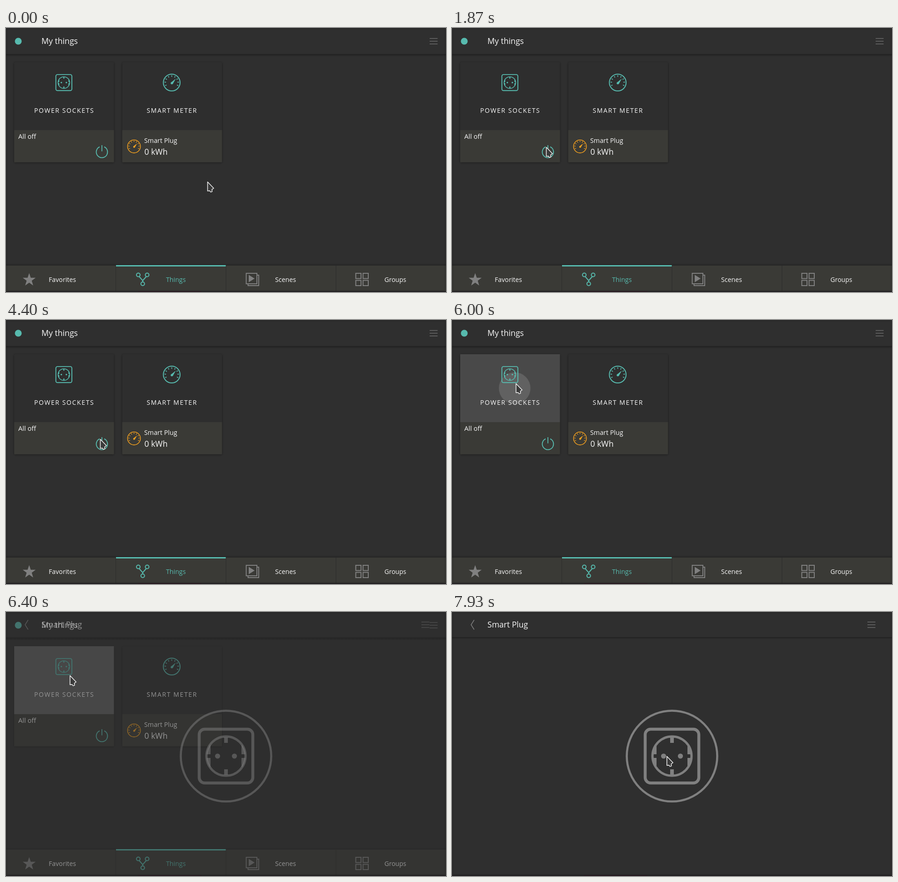
Recreate the animation shown at these times as an HTML page with a canvas. Size 968 px wide and 579 px high, loop 8000 ms.

```html
<!DOCTYPE html>
<html lang="en">
<head>
<meta charset="utf-8">
<title>My things</title>
<style>
html, body { margin: 0; width: 100%; height: 100%; overflow: hidden; background: #2f2f2f; }
canvas { display: block; width: 968px; height: 579px; }
</style>
</head>
<body>
<canvas id="stage" width="968" height="579"></canvas>
<script>
const W = 968, H = 579, LOOP = 8000, FPS = 15;
const BG = '#2f2f2f', PANEL = '#3a3a36', TEAL = '#57baae', ORANGE = '#f5a11f',
      GREY = '#808080', WHITE = '#f8f8f8';
const ctx = document.getElementById('stage').getContext('2d');

const clamp = v => Math.max(0, Math.min(1, v));
const progress = (t, from, to) => clamp((t - from) / (to - from));
const smooth = p => p * p * (3 - 2 * p);
const mix = (a, b, p) => a + (b - a) * p;

function text(str, x, y, size, color = WHITE, spacing = 0) {
  ctx.font = `${size}px "Open Sans", "Noto Sans", sans-serif`;
  ctx.letterSpacing = spacing + 'px';
  ctx.fillStyle = color;
  ctx.fillText(str, x, y);
  ctx.letterSpacing = '0px';
}

function path(points, close) {
  ctx.beginPath();
  points.forEach(([x, y]) => ctx.lineTo(x, y));
  if (close) ctx.closePath();
}

function line(points, color, width, close) {
  path(points, close);
  ctx.strokeStyle = color;
  ctx.lineWidth = width;
  ctx.stroke();
}

function ring(x, y, r, color, width) {
  ctx.beginPath();
  ctx.arc(x, y, r, 0, Math.PI * 2);
  ctx.strokeStyle = color;
  ctx.lineWidth = width;
  ctx.stroke();
}

function disc(x, y, r, color) {
  ctx.beginPath();
  ctx.arc(x, y, r, 0, Math.PI * 2);
  ctx.fillStyle = color;
  ctx.fill();
}

function rect(x, y, w, h, color) {
  ctx.fillStyle = color;
  ctx.fillRect(x, y, w, h);
}

function fade(y, h, alpha, up) {
  const g = ctx.createLinearGradient(0, y, 0, y + h);
  g.addColorStop(up ? 1 : 0, `rgba(0,0,0,${alpha})`);
  g.addColorStop(up ? 0 : 1, 'rgba(0,0,0,0)');
  rect(0, y, W, h, g);
}

function at(x, y, scale, draw) {
  ctx.save();
  ctx.translate(x, y);
  ctx.scale(scale, scale);
  draw();
  ctx.restore();
}

function socket(x, y, scale, color) {
  at(x, y, scale, () => {
    ctx.strokeStyle = color;
    ctx.lineWidth = 6.5;
    ctx.beginPath();
    ctx.roundRect(-59, -59, 118, 118, 12);
    ctx.stroke();
    ring(0, 0, 43, color, 5);
    disc(-18.5, 0, 5.6, color);
    disc(18.5, 0, 5.6, color);
    rect(-4, -41, 8, 12, color);
    rect(-4, 29, 8, 12, color);
    ctx.beginPath();
    ctx.arc(0, 0, 43, 0, Math.PI * 2);
    ctx.clip();
    for (const sx of [-43, 34])
      for (const sy of [-24, 4]) rect(sx, sy, 9, 20, color);
  });
}

function meter(x, y, scale, color) {
  at(x, y, scale, () => {
    ring(0, 0, 18.4, color, 2);
    for (let i = 0; i < 9; i++) {
      const a = Math.PI * (0.86 + i * 1.28 / 8);
      const c = Math.cos(a), s = Math.sin(a);
      line([[c * 12.6, s * 12.6], [c * 16, s * 16]], color, 1.7);
    }
    path([[-1.8, 0], [9, -8.6], [2.2, 3.2]], true);
    ctx.fillStyle = color;
    ctx.fill();
    disc(0.2, 1.4, 2.5, color);
  });
}

function power(x, y) {
  ctx.beginPath();
  ctx.arc(x, y, 12.4, -Math.PI / 2 + 0.42, Math.PI * 1.5 - 0.42);
  ctx.strokeStyle = TEAL;
  ctx.lineWidth = 1.8;
  ctx.stroke();
  line([[x, y - 15], [x, y - 1.5]], TEAL, 1.8);
}

function menu(x, y) {
  for (const dy of [-6, 0, 6]) rect(x, y + dy - 0.7, 17.5, 1.4, '#707070');
}

function card(x) {
  ctx.save();
  ctx.shadowColor = 'rgba(0,0,0,.45)';
  ctx.shadowBlur = 4;
  ctx.shadowOffsetY = 1;
  ctx.beginPath();
  ctx.roundRect(x, 75, 219.5, 219.5, 2);
  ctx.fillStyle = '#2e2e2e';
  ctx.fill();
  ctx.restore();
  rect(x, 224, 219.5, 70.5, PANEL);
}

function cardPress(t) {
  const wash = progress(t, 5740, 5960);
  if (!wash) return;
  ctx.save();
  ctx.beginPath();
  ctx.rect(18, 75, 219.5, 149);
  ctx.clip();
  rect(18, 75, 220, 149, `rgba(255,255,255,${0.13 * wash})`);
  const grow = progress(t, 5900, 6282);
  if (grow) disc(mix(141.5, 127.7, grow), 149.5, 133 * grow, 'rgba(255,255,255,.13)');
  ctx.restore();
}

function powerPress(t, from, to) {
  if (t <= from || t >= to) return;
  const alpha = progress(t, from, from + 140) * (1 - progress(t, to - 250, to));
  const tint = `rgba(255,255,255,${0.13 * alpha})`;
  disc(211, 271.5, 17, tint);
  const grow = progress(t, from + 80, from + 300);
  if (grow) disc(211, 271.5, 17 * grow, tint);
}

function tabs() {
  fade(516, 5, 0.22, true);
  rect(0, 521, W, 56, PANEL);
  for (const x of [241, 483.5, 725.5]) rect(x, 521, 1, 56, '#2d2d2b');
  rect(242, 520, 241.5, 3, TEAL);

  const star = Array.from({ length: 10 }, (_, i) => {
    const r = i % 2 ? 5.9 : 15, a = -Math.PI / 2 + i * Math.PI / 5;
    return [51 + r * Math.cos(a), 552.5 + r * Math.sin(a)];
  });
  path(star, true);
  ctx.fillStyle = GREY;
  ctx.fill();

  for (const [x, y] of [[291, 541.5], [310.5, 541.5], [300.8, 561]]) ring(x, y, 4, TEAL, 2);
  line([[292.8, 545], [300.8, 554], [308.7, 545]], TEAL, 2);
  line([[300.8, 553.5], [300.8, 557]], TEAL, 2);

  ctx.strokeStyle = GREY;
  ctx.lineWidth = 2;
  ctx.strokeRect(528.5, 538, 23.5, 23);
  line([[552, 542], [556, 542], [556, 565], [532.5, 565], [532.5, 561]], GREY, 2);
  path([[534, 541.5], [547, 549.5], [534, 557.5]], true);
  ctx.fillStyle = GREY;
  ctx.fill();

  ctx.lineWidth = 2;
  for (const x of [769.5, 785.5])
    for (const y of [538, 553.5]) ctx.strokeRect(x, y, 11.5, 11.5);

  text('Favorites', 94, 557, 14.2);
  text('Things', 352, 557, 14.2, TEAL);
  text('Scenes', 592, 557, 14.2);
  text('Groups', 832.5, 557, 14);
}

function home(t) {
  rect(0, 0, W, H, BG);
  fade(57, 6, 0.3);
  disc(27, 29, 7.5, TEAL);
  text('My things', 78, 35, 17.7);
  menu(932, 29);

  card(18);
  card(255.7);
  cardPress(t);
  socket(127.3, 119.7, 0.298, TEAL);
  meter(364.6, 119.7, 1, TEAL);
  text('POWER SOCKETS', 62, 186, 14, WHITE, 1.6);
  text('SMART METER', 309.5, 186, 14, WHITE, 1.6);

  text('All off', 27, 242.5, 14.6);
  powerPress(t, 2200, 2800);
  powerPress(t, 3667, 4400);
  power(211, 272);

  meter(281.6, 259.7, 0.77, ORANGE);
  text('Smart Plug', 304, 251.5, 14.3);
  text('0 kWh', 304.5, 277.5, 17.6);
  tabs();
}

function detail() {
  rect(0, 0, W, H, BG);
  fade(55, 5, 0.3);
  line([[48.7, 17.5], [42, 28], [48.7, 38.5]], GREY, 1.5);
  text('Smart Plug', 78, 34, 17.6);
  menu(914, 28);
  ring(484, 316, 99.5, GREY, 4.6);
  socket(484, 316, 1, GREY);
}

function frameEdges() {
  for (let i = 0; i < 4; i++) {
    ctx.strokeStyle = `rgba(0,0,0,${0.16 - i * 0.04})`;
    ctx.lineWidth = 1;
    ctx.strokeRect(i + 0.5, i + 0.5, W - 1 - 2 * i, H - 2 - 2 * i);
  }
  rect(0, 577, W, 2, '#1f1d1f');
  rect(290, 577, 140, 2, '#24161d');
}

function cursorAt(t) {
  if (t < 1740) {
    const s = smooth(progress(t, 867, 1733)), q = 1 - s;
    const bend = (a, b, c) => q * q * a + 2 * q * s * b + s * s * c;
    return [bend(443.5, 330, 202), bend(337.5, 480, 277)];
  }
  if (t < 4900) {
    const p = progress(t, 1733, 1867);
    return [mix(202, 207.5, p), mix(277, 261.5, p)];
  }
  if (t < 7000) {
    const p = smooth(progress(t, 4867, 5267));
    return [mix(207.5, 140.8, p), mix(261.5, 139.5, p)];
  }
  const p = smooth(progress(t, 7067, 7733)), nudge = t > 7900 ? 1 : 0;
  return [mix(140.8, 471.7, p) + nudge, mix(139.5, 315.5, p) + nudge];
}

function cursor(x, y) {
  at(x, y, 1, () => {
    path([[0, 0], [0, 20], [4.6, 19.4], [6.8, 22.4], [10, 21.4], [9.6, 16.6], [13.5, 14]], true);
    ctx.fillStyle = '#3b3b3b';
    ctx.fill();
    ctx.strokeStyle = '#f2f2f2';
    ctx.lineWidth = 1.5;
    ctx.lineJoin = 'round';
    ctx.stroke();
    ctx.lineJoin = 'miter';
  });
}

function render() {
  const now = performance.now() % LOOP;
  const t = Math.floor(now * FPS / 1000 + 0.1) * 1000 / FPS % LOOP;
  const reveal = progress(t, 6270, 6530);
  if (reveal < 1) home(t);
  if (reveal > 0) {
    ctx.globalAlpha = reveal;
    detail();
    ctx.globalAlpha = 1;
  }
  frameEdges();
  cursor(...cursorAt(t));
  requestAnimationFrame(render);
}
render();
</script>
</body>
</html>
```
